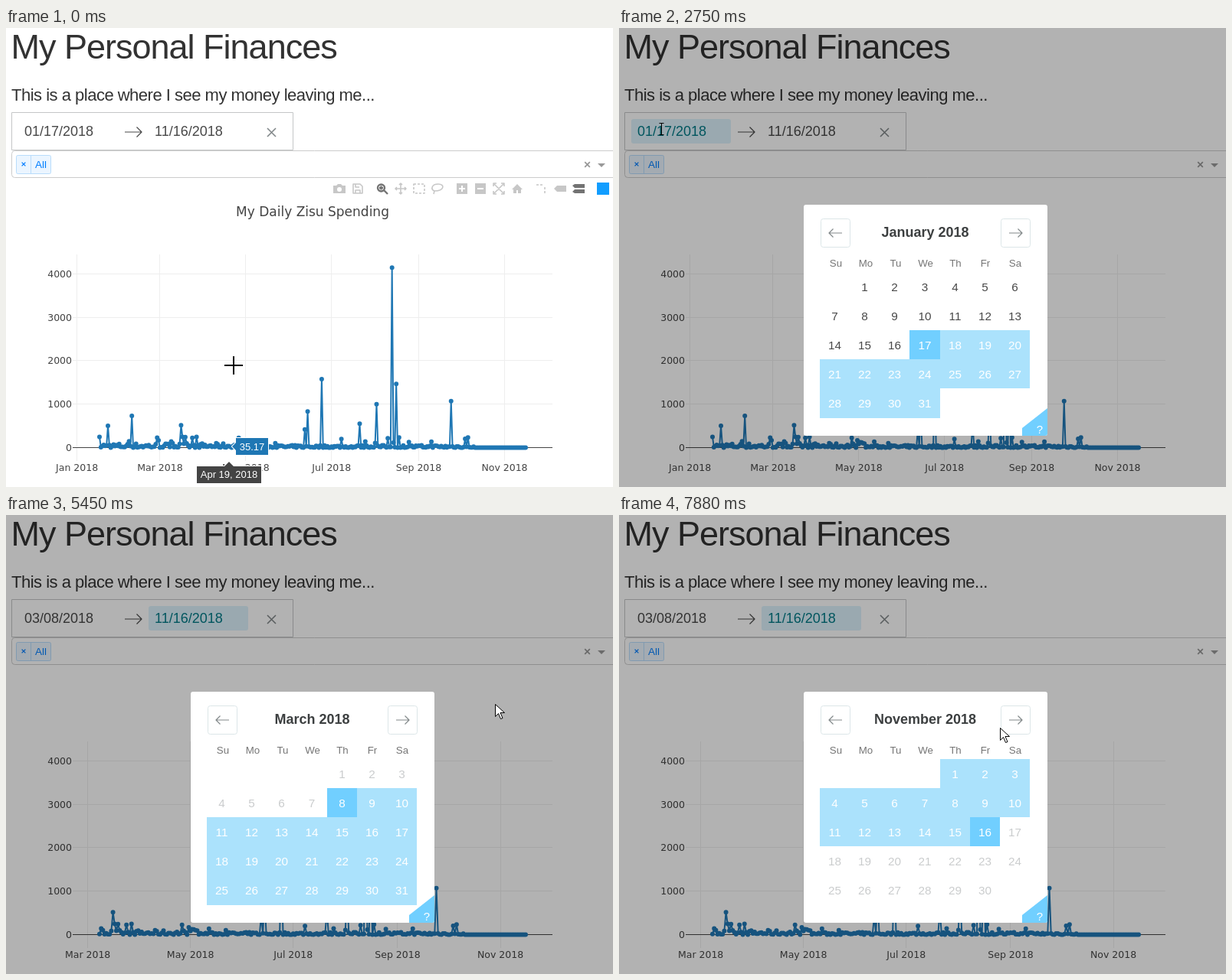
An HTML page with a canvas that plays this animation: 792x600 px, repeating every 8 s.

```html
<!DOCTYPE html>
<html lang="en">
<head>
<meta charset="utf-8">
<title>My Personal Finances</title>
<style>
html, body { margin: 0; width: 100%; height: 100%; overflow: hidden; background: #fff; }
canvas { display: block; }
</style>
</head>
<body>
<canvas id="stage" width="792" height="600"></canvas>
<script>
const ctx = document.getElementById('stage').getContext('2d');
const SANS = '"Liberation Sans", Arial, sans-serif', WIDE = '"DejaVu Sans", Verdana, sans-serif';
const LOOP = 8000, BLUE = '#1f77b4', INK = '#484848', GRAY = '#444';
const MONTHS = ['January', 'February', 'March', 'April', 'May', 'June', 'July', 'August',
  'September', 'October', 'November', 'December'];

const dayOf = (month, date) => (Date.UTC(2018, month, date) - Date.UTC(2018, 0, 17)) / 864e5;
const LAST = dayOf(10, 16), MARCH_8 = dayOf(2, 8);

// Pointer stops: time, x, y
const STOPS = [[-90, 289, 444], [120, 307, 438], [900, 307, 438], [1213, 331, 421], [1510, 305, 428],
  [1780, 279, 432], [2060, 275, 428], [2480, 54, 132], [2750, 54, 132], [3420, 517, 270], [4240, 517, 270],
  [4540, 428, 377], [4810, 429, 378], [5380, 640, 250], [5810, 628, 233], [6400, 480, 410],
  [6930, 336, 222], [7210, 281, 150], [7350, 281, 150], [7880, 497, 278]];

// Daily spending: small skewed amounts, some busier days, a few big bills
const BILLS = { 6: 500, 23: 730, 58: 515, 92: 35.17, 103: 168.8, 146: 420, 148: 830, 158: 1575,
  185: 550, 197: 1000, 208: 4140, 211: 1465, 250: 1070 };
let seed = 7;
const random = () => (seed = seed * 16807 % 2147483647) / 2147483647;
const spending = Array.from({ length: LAST + 1 }, (_, day) => {
  const busy = random() < 0.12, r = random();
  const amount = busy ? 100 + 160 * r : r ** 1.6 * (day < 110 ? 100 : 55);
  return BILLS[day] ?? (day > 266 ? 0 : +amount.toFixed(2));
});

const ramp = (t, a, b) => Math.min(1, Math.max(0, (t - a) / (b - a)));
const ease = (t, a, b) => ramp(t, a, b) ** 2 * (3 - 2 * ramp(t, a, b));
const inside = ([x, y], l, t, r, b) => x >= l && x < r && y >= t && y < b;
const inPlot = p => inside(p, 87, 296, 713, 566);

function pointerAt(t) {
  let i = 1;
  while (i < STOPS.length - 1 && STOPS[i][0] < t) i++;
  const [a, x, y] = STOPS[i - 1], [b, x2, y2] = STOPS[i], k = ramp(t, a, b);
  return [x + (x2 - x) * k, y + (y2 - y) * k];
}

function text(str, x, y, font, color, align = 'left', spacing = 0) {
  ctx.font = font;
  ctx.fillStyle = color;
  ctx.textAlign = align;
  ctx.letterSpacing = spacing + 'px';
  ctx.fillText(str, x, y);
}
function box(x, y, w, h, fill, stroke, r = 0) {
  ctx.beginPath();
  ctx.roundRect(x, y, w, h, r);
  if (fill) { ctx.fillStyle = fill; ctx.fill(); }
  if (stroke) { ctx.strokeStyle = stroke; ctx.lineWidth = 1; ctx.stroke(); }
}
function shape(d, x, y, fill, stroke, width = 1) {
  const p = new Path2D(d);
  ctx.save();
  ctx.translate(x, y);
  if (fill) { ctx.fillStyle = fill; ctx.fill(p, 'evenodd'); }
  if (stroke) { ctx.strokeStyle = stroke; ctx.lineWidth = width; ctx.stroke(p); }
  ctx.restore();
}
const line = (d, x, y, color, width) => shape(d, x, y, null, color, width);
const cross = (x, y, r, color, w) => line(`M${-r} ${-r}L${r} ${r}M${r} ${-r}L${-r} ${r}`, x, y, color, w);
const arrow = (x, y, s, r, head, color) =>
  line(`M${-r * s} 0H${r * s}M${(r - head) * s} ${-head}L${r * s} 0L${(r - head) * s} ${head}`, x, y, color, 1.2);

function drawForm(start, focus) {
  text('My Personal Finances', 6.5, 40, '45px ' + SANS, '#323232', 'left', -1);
  text('This is a place where I see my money leaving me...', 7, 95, '22px ' + SANS, '#323232', 'left', -0.5);
  box(7.5, 110.5, 367, 49, '#fff', '#c4c6c7');
  [start, '11/16/2018'].forEach((date, i) => {
    const x = 16 + i * 170, on = focus === i;
    if (on) box(x, 119, 130, 32, '#dcf2fb', null, 3);
    text(date, x + 8, 141, '18px ' + SANS, on ? '#007a87' : INK);
  });
  arrow(166, 136, 1, 11, 6.5, INK);
  cross(346.5, 136.5, 5.5, '#82888a', 1.6);

  box(7.5, 160.5, 800, 35, '#fff', '#ccc', 4);
  box(13.5, 166.5, 45, 24, '#ebf5ff', '#b8dcfb', 2);
  line('M0 0V24', 32.5, 166.5, '#b8dcfb');
  cross(23, 178, 2.4, '#007eff', 1.3);
  text('All', 38, 183, '13.5px ' + SANS, '#007eff');
  cross(758.5, 178.5, 3.3, '#999', 1.8);
  shape('M-5 0H5L0 5z', 777, 177, '#999');
}

const SOLID = {
  camera: 'M-8-4h4l2-2h4l2 2h4v10h-16zM3 1a3 3 0 1 0-6 0a3 3 0 1 0 6 0z',
  plus: 'M-7-7h14v14h-14zM-1-4h2v3h3v2h-3v3h-2v-3h-3v-2h3z',
  minus: 'M-7-7h14v14h-14zM-4-1h8v2h-8z',
  home: 'M0-6L7 1H5V6H1V2H-1V6H-5V1H-7z',
  closest: 'M-8 0l4-4h12v8h-12z',
  compare: 'M-8-4l3-2h13v5h-13zM-8 4l3-3h13v5h-13z'
};
const OUTLINE = {
  save: 'M-6-6h9l3 3v9h-12zM-3-6v4h5M-3 6v-4h6v4',
  zoom: 'M3-1a4.5 4.5 0 1 0-9 0a4.5 4.5 0 1 0 9 0M2 2l5 5M-4-1h5M-1.5-3.5v5',
  pan: 'M-7 0H7M0-7V7M-2-5l2-2 2 2M-2 5l2 2 2-2M-5-2l-2 2 2 2M5-2l2 2-2 2',
  select: 'M-7-6h14v12h-14z',
  lasso: 'M-4 3C-9 1-8-6 1-6S9 3-4 3L-5 7',
  fit: 'M-6-6L6 6M6-6L-6 6M-7-3v-4h4M3-7h4v4M7 3v4h-4M-3 7h-4v-4',
  spikes: 'M-7-5h9M4-2v9'
};
function drawModebar(alpha) {
  ctx.save();
  ctx.globalAlpha = alpha;
  let x = 435;
  for (const group of ['camera save', 'zoom pan select lasso', 'plus minus fit home', 'spikes closest compare']) {
    for (const name of group.split(' ')) {
      const active = name === 'zoom' || name === 'compare';
      const color = `rgba(68,68,68,${active ? 0.75 : 0.3})`;
      ctx.setLineDash(/select|spikes/.test(name) ? [3, 2] : []);
      if (SOLID[name]) shape(SOLID[name], x, 210, color);
      else line(OUTLINE[name], x, 210, color, active ? 2.4 : 1.6);
      x += 24;
    }
    x += 8;
  }
  box(x - 8, 202, 16, 16, '#119dff');
  ctx.restore();
}

function bubble(d, x, y, color) {
  line(d, x, y, '#fff', 2);
  shape(d, x, y, color);
}
function drawChart(first, tip) {
  const step = 556 / (LAST - first);
  const px = d => 122 + (d - first) * step, py = v => 548.5 - v * 0.0568;
  const font = '12.5px ' + WIDE;
  text('My Daily Zisu Spending', 400, 246, '17px ' + WIDE, GRAY, 'center');
  for (let m = 0; m < 12; m += 2) {
    const x = px(dayOf(m, 1));
    if (x < 87) continue;
    line('M0 296V566', Math.floor(x) + 0.5, 0, '#eee');
    text(MONTHS[m].slice(0, 3) + ' 2018', x, 579, font, GRAY, 'center');
  }
  for (let v = 0; v <= 4000; v += 1000) {
    line('M87 0H713', 0, Math.floor(py(v)) + 0.5, v ? '#eee' : GRAY);
    text(v, 86, py(v) + 4.5, font, GRAY, 'right');
  }
  const curve = new Path2D(), dots = new Path2D();
  for (let d = first; d <= LAST; d++) {
    const x = px(d), y = py(spending[d]);
    curve.lineTo(x, y);
    dots.moveTo(x, y);
    dots.arc(x, y, 3, 0, 7);
  }
  ctx.lineJoin = 'round';
  line(curve, 0, 0, BLUE, 2);
  ctx.fillStyle = BLUE;
  ctx.fill(dots);
  if (tip) drawTip(Math.round(first + (tip[0] - 122) / step), px, py);
}
function drawTip(day, px, py) {
  const x = Math.round(px(day)), y = Math.round(py(spending[day])), font = '13px ' + SANS;
  const date = new Date(Date.UTC(2018, 0, 17 + day));
  const str = `${MONTHS[date.getUTCMonth()].slice(0, 3)} ${date.getUTCDate()}, 2018`;
  ctx.font = font;
  ctx.letterSpacing = '0px';
  const w = Math.round(ctx.measureText(spending[day]).width + 9);
  const h = Math.round(ctx.measureText(str).width / 2 + 5);
  bubble(`M4 0L9-5V-11H${9 + w}V11H9V5z`, x, y, BLUE);
  text(spending[day], x + 9 + w / 2, y + 4.5, font, '#fff', 'center');
  bubble(`M0 567L6 573H${h}V595H${-h}V573H-6z`, x, 0, GRAY);
  text(str, x, 588, font, '#fff', 'center');
}

// Calls back with each date of a month and its cell
function eachCell(month, fn) {
  const lead = new Date(Date.UTC(2018, month, 1)).getUTCDay();
  const count = new Date(Date.UTC(2018, month + 1, 0)).getUTCDate();
  const left = c => Math.round(262 + c * 39.15), top = r => Math.round(319 + r * 38.1);
  for (let n = 1; n <= count; n++) {
    const c = (lead + n - 1) % 7, r = Math.floor((lead + n - 1) / 7);
    fn(n, left(c), top(r), left(c + 1), top(r + 1));
  }
}
function drawMonth(month, dx, first, focus, pointer) {
  text(MONTHS[month] + ' 2018', 399.5 + dx, 273, 'bold 18px ' + SANS, '#3c3f40', 'center');
  eachCell(month, (n, l, t, r, b) => {
    const d = dayOf(month, n), picked = d === first || d === LAST;
    const hover = !dx && inside(pointer, l, t, r, b);
    const ranged = d >= first && d <= LAST;
    const blocked = d > LAST || (focus && d < first);
    let ink = ranged ? '#fff' : blocked ? '#cacccd' : INK;
    if (ranged) box(l + dx, t, r - l, b - t, picked || hover ? '#71cfff' : '#abe2fc');
    else if (hover && !blocked) box(l + dx, t, r - l, b - t, '#e4e7e7');
    if (hover && !picked && !blocked) ink = INK;
    text(n, (l + r) / 2 + dx, t + 25, '15.3px ' + SANS, ink, 'center');
  });
}
function drawModal(month, first, focus, pointer) {
  ctx.fillStyle = 'rgba(0,0,0,.3)';
  ctx.fillRect(0, 0, 792, 600);
  ctx.save();
  box(241, 231, 318, 302, '#fff', null, 3);
  ctx.clip();
  const m = Math.floor(month), dx = Math.round((month - m) * 318);
  drawMonth(m, -dx, first, focus, pointer);
  if (dx) drawMonth(m + 1, 318 - dx, first, focus, pointer);
  'Su Mo Tu We Th Fr Sa'.split(' ').forEach((s, i) =>
    text(s, 283 + i * 39, 312, '13.3px ' + SANS, '#757575', 'center'));
  for (const s of [-1, 1]) {
    const x = 400 + s * 117.5;
    box(x - 19, 249.5, 38, 37, '#fff', '#dce6e8', 3);
    arrow(x, 268, s, 8.5, 5.5, '#82888a');
  }
  shape('M526 523L559 497V533H526z', 0, 0, '#71cfff');
  text('?', 549, 530, '15px ' + SANS, '#fff', 'center');
  ctx.restore();
}

function drawPointer(p, open, month) {
  const [x, y] = p.map(Math.round);
  let hand = false;
  if (open) {
    hand = inside(p, 263, 249, 302, 287) || inside(p, 498, 249, 537, 287);
    eachCell(Math.round(month), (n, ...cell) => { hand ||= inside(p, ...cell); });
  }
  if (hand) {
    shape('M-2 1q2-3 4 0v6q2-1 4 0q2-1 3 1q2-1 3 1v6q0 4-3 7v2h-9v-2l-6-8q-1-3 2-3l2 2z', x, y - 1, '#fff', '#000', 1.2);
  } else if (inside(p, 16, 119, 146, 152) || inside(p, 186, 119, 316, 152)) {
    line('M-3-7.5h6M0-7v14M-3 7.5h6', x + 0.5, y, '#000');
  } else if (!open && inPlot(p)) {
    line('M-12 0H12M0-12V12', x, y, '#000', 2);
  } else {
    shape('M0 0v16l4-4 3 7 2.5-1-3-7h5.5z', x + 0.5, y + 0.5, '#fff', '#000');
  }
}

function draw(t) {
  const late = t >= 7350, open = late || (t >= 2750 && t < 5500), focus = t >= 4810 ? 1 : 0;
  const pointer = pointerAt(t), lagged = pointerAt(t - 65);
  const month = late ? 10 : ease(t, 3680, 3900) + ease(t, 4020, 4240);
  const tip = !open && inPlot(pointer) && inPlot(lagged) ? lagged : null;

  ctx.fillStyle = '#fff';
  ctx.fillRect(0, 0, 792, 600);
  drawForm(focus ? '03/08/2018' : '01/17/2018', open ? focus : -1);
  drawModebar(1 - ramp(t, 2150, 2440) + ramp(t, 5785, 6000) - ramp(t, 6930, 7236));
  drawChart(t >= 5050 ? MARCH_8 : 0, tip);
  if (open) drawModal(month, focus ? MARCH_8 : 0, focus, pointer);
  drawPointer(pointer, open, month);
}

const begin = performance.now();
function tick() {
  draw((performance.now() - begin) % LOOP);
  requestAnimationFrame(tick);
}
tick();
</script>
</body>
</html>
```
